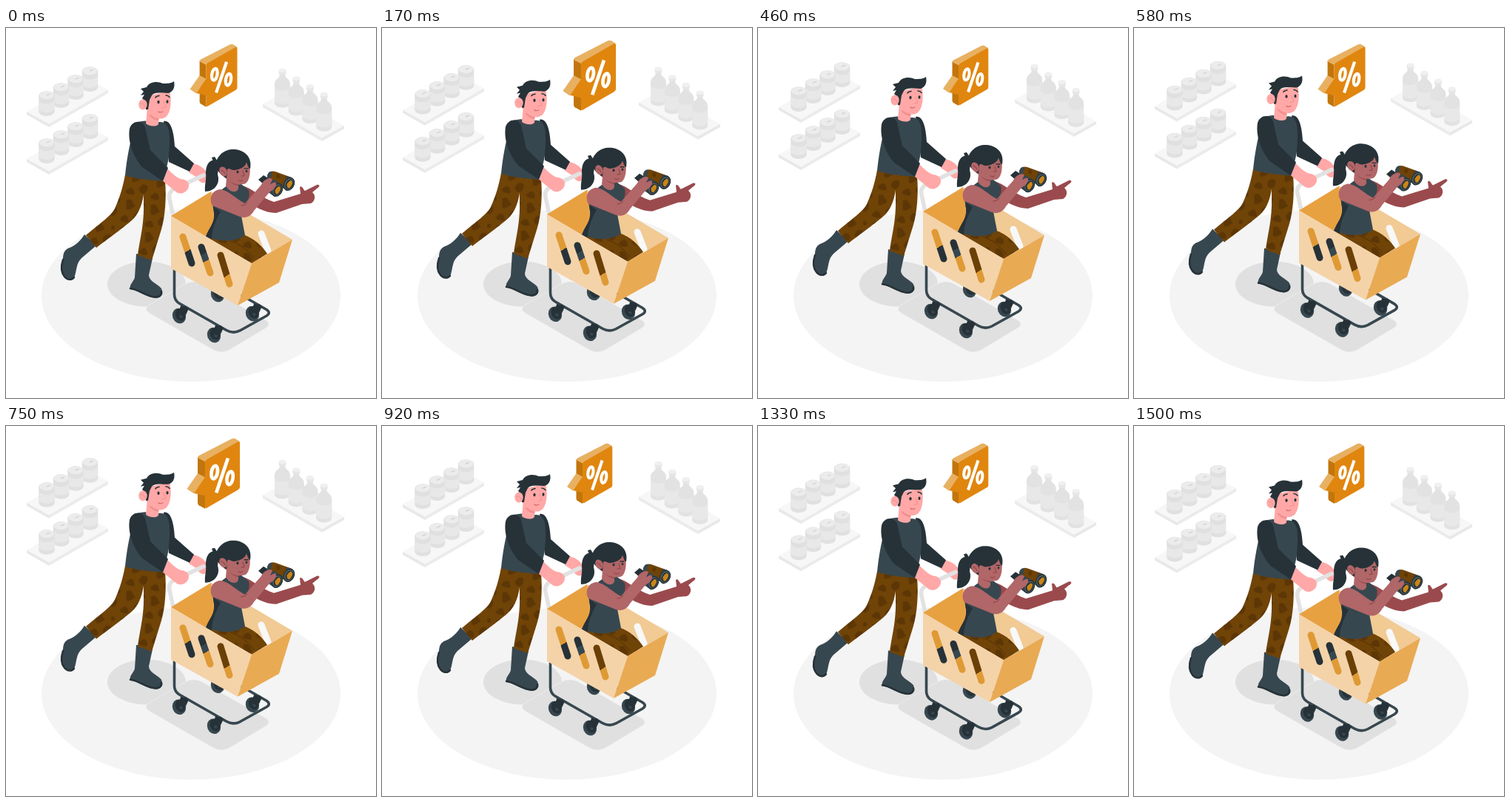
Write an HTML page that moves like this. It is 500 by 500 pixels and loops after 1540 ms.

```html
<!DOCTYPE html>
<html lang="en">
<head>
<meta charset="utf-8">
<title>Shopping trip</title>
<style>
html, body { margin: 0; height: 100%; overflow: hidden; background: #fff; }
svg { display: block; width: 100vw; height: 100vh; }
.dark { fill: #263238; }
.slate { fill: #37474f; }
.camo { fill: url(#camo); }
.pink { fill: #ffa8a7; }
.tan { fill: #b16668; }
.line { fill: none; stroke-linecap: round; stroke-linejoin: round; }
</style>
</head>
<body>
<svg viewBox="0 0 500 500">
<defs>
  <pattern id="camo" width="34" height="38" patternUnits="userSpaceOnUse" patternTransform="rotate(12)">
    <rect width="34" height="38" fill="#704307"/>
    <path fill="#5c3605" d="M3 4q5-5 9 0t5 5-5 5-7-2-2-8M20 17q7-3 8 2t-2 8-7 0 1-10M3 26q4-4 7 0t2 6-8 1-1-7M25 3q5-1 5 3t-5 2z"/>
  </pattern>
  <linearGradient id="slot1" x2=".2" y2="1">
    <stop offset=".62" stop-color="#df9a35"/><stop offset=".62" stop-color="#263238"/>
  </linearGradient>
  <linearGradient id="slot2" x2=".2" y2="1">
    <stop offset=".3" stop-color="#263238"/><stop offset=".3" stop-color="#37474f"/>
    <stop offset=".62" stop-color="#37474f"/><stop offset=".62" stop-color="#df9a35"/>
  </linearGradient>
  <linearGradient id="slot3" x2=".2" y2="1">
    <stop offset=".82" stop-color="#6a4006"/><stop offset=".82" stop-color="#df9a35"/>
  </linearGradient>
  <g id="can">
    <path fill="#e0e0e0" d="M44.3 91.5V113a10.7 6 0 0 0 21.4 0V91.5z"/>
    <path fill="#e8e8e8" d="M44.3 96.5a10.7 6 0 0 0 21.4 0V108a10.7 6 0 0 1-21.4 0z"/>
    <ellipse cx="55" cy="91.5" rx="10.7" ry="6.2" fill="#e0e0e0"/>
    <ellipse cx="55" cy="91" rx="9.8" ry="5.4" fill="#ececec"/>
    <path class="line" stroke="#d4d4d4" stroke-width="1.4" d="M55 91l4-1.5"/>
  </g>
  <g id="bottle">
    <path fill="#e2e2e2" d="M369.6 60V65C369 68 363 69 363 76V102a10.5 5.8 0 0 0 21 0V76C384 69 378 68 377.4 65V60z"/>
    <path fill="#e8e8e8" d="M363 79a10.5 5.8 0 0 0 21 0V97a10.5 5.8 0 0 1-21 0z"/>
    <path fill="#e6e6e6" d="M368.6 57.5V61a4.9 2.8 0 0 0 9.8 0V57.5z"/>
    <ellipse cx="373.5" cy="57.5" rx="4.9" ry="2.8" fill="#f0f0f0"/>
  </g>
  <g id="board">
    <path fill="#f7f7f7" d="M28 113L108 67l30 16.5-80 46z"/>
    <path fill="#e8e8e8" d="M28 113l30 16.5v4.5L28 117z"/>
    <path fill="#ebebeb" d="M58 129.5l80-46V88l-80 46z"/>
  </g>
  <g id="shelf">
    <use href="#board"/>
    <use href="#can" x="58.5" y="-33"/><use href="#can" x="39" y="-22"/>
    <use href="#can" x="19.5" y="-11"/><use href="#can"/>
  </g>
  <g id="wheel">
    <path class="dark" d="M2-14l11 4-5 11-8-3z"/>
    <ellipse class="slate" rx="9" ry="10.5" transform="rotate(-22)"/>
    <ellipse class="dark" cx="2" cy="-1" rx="6.5" ry="8.5" transform="rotate(-22)"/>
    <ellipse class="slate" cx="2.5" cy="0" rx="2.2" ry="3"/>
    <path class="dark" d="M1-11l9-2 1 3-6 10-4-1z"/>
  </g>
  <g id="lens">
    <ellipse class="dark" rx="7.2" ry="9.6" transform="rotate(28)"/>
    <ellipse fill="#56656d" rx="5.9" ry="8" transform="rotate(28)"/>
    <ellipse class="dark" cx=".5" rx="4.9" ry="7" transform="rotate(28)"/>
    <path fill="#c98518" d="M-3 0Q2-7 4-4T1 5Q-3 7-3 0z"/>
  </g>
</defs>

<ellipse cx="250" cy="361.5" rx="202" ry="116.5" fill="#f4f4f4"/>
<g fill="#e0e0e0">
  <ellipse cx="190" cy="346" rx="53" ry="30.5"/>
  <path stroke="#f4f4f4" stroke-width=".6" d="M192 375L242 346Q252 340 264 345L353 396Q358 401 352 405L302 435Q291 441 280 435L193 385Q186 380 192 375z"/>
</g>

<g id="scene">
  <use href="#shelf"/>
  <use href="#shelf" y="64"/>
  <use href="#board" transform="translate(485 19) scale(-1 1)"/>
  <use href="#bottle"/><use href="#bottle" x="18.8" y="10.7"/>
  <use href="#bottle" x="37.4" y="21.4"/><use href="#bottle" x="56.2" y="32"/>

  <g id="man">
    <!-- back leg -->
    <path class="slate" d="M106 279L122 294 102 311C95 318 96 325 93 335 90 342 82 342 78 336 73 330 74 320 77 312 77 303 80 299 86 297 95 293 101 287 106 279z"/>
    <path class="line" stroke="#263238" stroke-width="2.4" d="M77 313C74 322 74 330 79 336 83 341 89 341 92 337"/>
    <path class="camo" d="M161 198L188 204C187 228 183 246 173 257 164 266 143 281 122 297L108 280C128 263 142 254 147 244 154 228 158 215 161 198z"/>
    <!-- front leg -->
    <path class="slate" d="M176 305L198 311 193 334C193 342 205 346 210 352 213 360 209 365 202 365 190 364 180 355 168 353 166 347 173 342 174 337z"/>
    <path class="line" stroke="#263238" stroke-width="2.6" d="M168 352C180 353 189 363 202 363.500 208 363.500 211 360 210 356"/>
    <path class="camo" d="M186 200L215 206C217 230 215 255 210 272L197 314 178 307C181 284 187 266 186 235z"/>
    <!-- far arm -->
    <path class="pink" d="M253 183C262 185 269 190 271 196L270 208C266 212 260 207 258 202L247 195z"/>
    <path class="dark" d="M213 126C223 124 227 141 228 160L254 183 248 194 220 181z"/>
    <!-- torso -->
    <path class="slate" d="M178 127Q190 124 194 127L208 127Q217 126 220 138C222 152 221 165 219 180L213 207C195 206 175 204 161 199 163 180 166 160 172 140z"/>
    <!-- head -->
    <path class="pink" d="M191 108L207 118 206 130C203 134 193 133 189 129z"/>
    <path fill="#f28f8f" d="M193 117L207 120 206 125C200 125 196 121 193 117z"/>
    <path class="pink" d="M191 92L221 85C224 97 223 111 218 118 213 125 203 123 198 119L189 110z"/>
    <path class="dark" d="M182 82L190 80C193 73 204 71 212 75 218 75 223 75 227 72 229 81 225 87 219 88 209 88 201 86 197 91L194 97 192 110 189 110 188 99 184 95 187 90 182 91 186 86z"/>
    <ellipse class="pink" cx="185" cy="103.500" rx="5.700" ry="7"/>
    <path class="line" stroke="#f28f8f" d="M182 102Q186 101 188 106M213 99L216 107 211 108"/>
    <ellipse class="dark" cx="206" cy="100" rx="1.600" ry="2.200"/>
    <ellipse class="dark" cx="218" cy="99.500" rx="1.500" ry="2.200"/>
    <path class="line" stroke="#263238" stroke-width="1.600" d="M202 94Q203 92 207 91.500M216 91Q219 91 221 93.500"/>
    <path class="line" stroke="#d86c6c" stroke-width="1.300" d="M206 113Q208 115 212 113"/>
    <path class="line" stroke="#e2e2e2" stroke-width="5.500" d="M226 254L221 231Q219 223 226 218L267 199"/>
    <!-- near arm -->
    <path class="pink" d="M218 190C224 196 230 202 236 204 246 205 249 211 246 217 242 224 234 226 228 220L211 206z"/>
    <path class="dark" d="M167 136C170 125 184 123 188 134L195 165 219 189 212 207 184 188C173 175 164 155 167 136z"/>
  </g>

  <g id="cart-back">
    <use href="#wheel" x="286" y="360"/>
    <path class="line" stroke="#37474f" stroke-width="3.600" d="M227.500 320V360Q227.500 368 234 372L298 408.500Q307 413.500 316 409L352 389Q358.500 385 352 380.500L318 361"/>
    <use href="#wheel" x="234" y="389"/><use href="#wheel" x="281" y="415"/><use href="#wheel" x="333" y="386"/>
    <path fill="#e8a141" d="M223 254L277 221 292 272 277 286z"/>
    <path fill="#f1ca94" d="M277 221L387 286 332 318 285 290z"/>
    <path class="line" stroke="#f8f8f8" stroke-width="9" d="M345 278L354 301"/>
  </g>

  <g id="woman">
    <path class="camo" d="M272 283L320 279C336 284 347 296 353 305L332 318z"/>
    <path class="line" stroke="#553103" d="M303 288Q320 292 335 311"/>
    <path fill="#9a4a4d" d="M319 213C332 216 344 229 362 235L398 224 397 215C400 212 402 219 404 220L420 212C425 211 424 215 420 217L414 222C419 226 418 234 412 237L400 238 365 250C350 250 333 241 323 230z"/>
    <path class="slate" d="M292 218L300 212 318 211 328 219C331 230 323 242 318 254L323 280C307 291 288 288 270 282 274 270 283 263 281 250L279 238z"/>
    <path class="dark" d="M280 241L290 248C282 262 278 274 278 285L270 282C274 270 283 263 281 250z"/>
    <path class="tan" d="M298 203L314 209 314 217C312 224 301 222 297 213z"/>
    <path fill="#9a4a4d" d="M301 206L315 210 314 213Q306 212 301 206z"/>
    <path class="tan" d="M296 187L329 182C331 196 329 206 324 210 316 213 307 211 302 207L294 201z"/>
    <path class="dark" d="M288 181C276 174 270 184 270 196 271 206 268 212 269 221 282 221 290 210 286 198z"/>
    <path class="dark" d="M278 175L282 174 287 182 281 183zM283 187C284 171 297 163 309 164 323 165 333 175 330 190 328 191 327 186 325 182 323 188 316 191 309 192 304 193 302 188 299 191L298 203C293 200 287 196 283 187z"/>
    <ellipse class="tan" cx="293.500" cy="194" rx="5" ry="6.800" transform="rotate(-25 293.500 194)"/>
    <path class="line" stroke="#8b4145" d="M291 192Q295 193 296 197M320 193L322 200 318 200M314 206Q317 208 320 206"/>
    <ellipse class="dark" cx="313" cy="194.500" rx="1.500" ry="1.900"/>
    <ellipse class="dark" cx="325" cy="193.500" rx="1.300" ry="1.800"/>
    <path class="line" stroke="#263238" stroke-width="1.300" d="M309 191L315 190M322 190L327 190"/>
    <!-- binoculars -->
    <path class="dark" d="M341 205L348 199 356 204 349 212z"/>
    <path class="camo" d="M354 199Q357 192 364 194L386 202 378 218 362 210z"/>
    <path class="slate" d="M353 199Q355 193 360 194L357 206 353 204zM380 200L387 203 379 219 373 215z"/>
    <path class="slate" d="M352 206L362 205 371 211 363 228 350 219z"/>
    <use href="#lens" x="382.500" y="211"/><use href="#lens" x="366.500" y="219"/>
    <!-- near arm -->
    <path class="tan" d="M290 218C277 219 274 232 279 240L316 255C325 258 331 254 335 247L356 222C361 219 366 214 365 210 363 206 359 211 357 211L360 205C357 200 347 206 345 212L323 237C312 232 302 220 290 218z"/>
    <path class="line" stroke="#8b4145" d="M318 240Q323 240 326 236"/>
  </g>

  <g id="basket">
    <path fill="#f4d3a9" d="M223 254L332 318 313 375 223 325z"/>
    <path fill="#e9aa54" d="M332 318L387 286 369 344 313 375z"/>
    <g class="line" stroke-width="9">
      <path stroke="url(#slot1)" d="M239 282L251 318"/>
      <path stroke="url(#slot2)" d="M264 296L276 331"/>
      <path stroke="url(#slot3)" d="M290 307L302 346"/>
    </g>
  </g>
</g>

<g id="bubble">
  <path fill="#c2750c" d="M262.500 45L271 50V105L264 101Q262.500 100 262.500 98z"/>
  <path fill="#e8b061" d="M262.500 46Q262.500 44.500 264 43.500L301 24.500Q304 23 306 24L311 27 271 50.500z"/>
  <path fill="#e0860f" d="M271 51Q271 49.500 273 48L309 27.500Q311.300 26.500 311.300 29V79.500Q311.300 82 309.500 83L273 104Q271 105 271 103V90L258 87 271 68z"/>
  <path fill="#e8b061" d="M250 82L262.500 64 271 68.500 258 87.500z"/>
  <g class="line" stroke="#fff" stroke-width="4">
    <ellipse cx="281.900" cy="62.800" rx="3.500" ry="7.600" transform="rotate(10 281.900 62.800)"/>
    <ellipse cx="299.800" cy="69.500" rx="3.400" ry="7.600" transform="rotate(10 299.800 69.500)"/>
    <path stroke-linecap="butt" d="M297.500 46.500L284 86.500"/>
  </g>
</g>
</svg>
<script>
const LOOP = 1540;
const scene = document.getElementById('scene');
const bubble = document.getElementById('bubble');

// One hump around a centre, zero outside its half width.
const beat = (t, centre, half) =>
  Math.abs(t - centre) < half ? Math.cos((t - centre) / half * Math.PI / 2) : 0;

function draw(now) {
  const t = now % LOOP;
  const phase = ((t + 40) % LOOP) / LOOP;
  const lift = 10 * (1 - Math.abs(2 * phase - 1));
  const scale = 1 + 0.17 * (beat(t, 190, 225) + beat(t, 735, 185));
  scene.setAttribute('transform', `translate(0 ${0.5 - lift})`);
  bubble.setAttribute('transform', `translate(283 64.5) scale(${scale}) translate(-283 -64.5)`);
  requestAnimationFrame(draw);
}
draw(performance.now());
</script>
</body>
</html>
```
